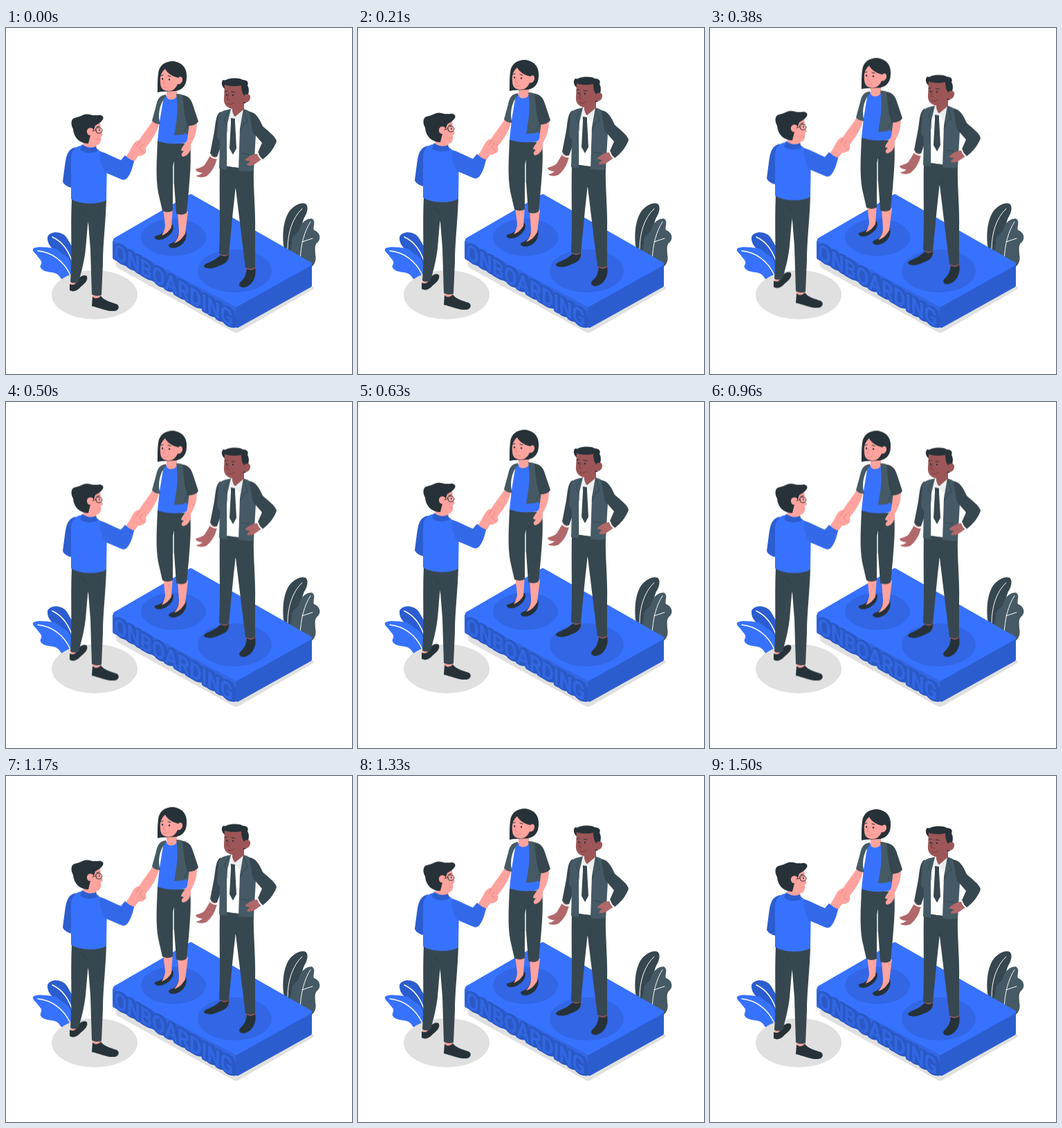
These frames come from a looping animation (500 px wide and 500 px high, 1.54 s). An HTML page:

```html
<!DOCTYPE html>
<html lang="en">
<head>
<meta charset="utf-8">
<title>Onboarding</title>
<style>
  html, body { margin: 0; width: 100%; height: 100%; overflow: hidden; background: #fff; }
  svg { display: block; width: 100%; height: 100%; }
  .blue { fill: #3772ff; }
  .blue2 { fill: #3266e4; }
  .blue3 { fill: #2c5dcf; }
  .dark { fill: #263238; }
  .slate { fill: #37474f; }
  .grey { fill: #455a64; }
  .skin { fill: #ffa39e; }
  .brown { fill: #9c5657; }
  .brown2 { fill: #b1686a; }
  .line { fill: none; stroke-linecap: round; stroke-linejoin: round; }
  .vein { stroke: #fff; stroke-width: 1.4; }
  .ink { stroke: #263238; stroke-width: 1; }
  .fold { stroke: #263238; stroke-width: .8; opacity: .6; }
  .blush { stroke: #e77f7c; stroke-width: .9; }
  .word { font: 700 33px Roboto, sans-serif; stroke-linejoin: round; }
  .float { animation: rise 770ms cubic-bezier(.37, 0, .63, 1) -40ms infinite alternate; }
  @keyframes rise { to { transform: translateY(-8.2px); } }
</style>
</head>
<body>
<svg viewBox="0 0 500 500">
  <defs>
    <text id="word" class="word" transform="matrix(.82 .477 0 1 156 333)">ONBOARDING</text>
  </defs>

  <!-- plants -->
  <g>
    <path class="blue3" d="M98 360C90 348 84 338 76 328C70 320 59 315 60 302C63 294 76 293 84 299C91 305 92 313 98 319C105 329 105 347 98 360Z"/>
    <path class="line vein" d="M67 302C80 308 91 321 97 342"/>
    <path class="blue" d="M94 366C86 368 81 365 78 360C73 352 66 354 59 352C52 350 47 346 51 341C53 336 47 333 45 329C42 325 38 323 39 319C45 315 58 317 67 318C75 319 78 325 84 328C93 333 98 345 95 365Z"/>
    <path class="line vein" d="M46 322C66 324 83 336 93 357"/>
    <path class="slate" d="M402 320C399 304 400 284 406 271C411 259 425 251 433 254C438 258 435 268 431 274C427 282 427 294 422 302L414 325Z"/>
    <path class="line vein" style="stroke-width:1" d="M428 261C414 274 407 296 407 319"/>
    <path class="grey" d="M410 326C411 318 414 313 413 306C415 298 423 298 424 290C427 280 437 274 443 276C448 280 443 288 445 292C453 295 456 303 451 309C445 313 447 321 447 327C449 336 446 343 440 346L410 330Z"/>
    <path class="line vein" style="stroke-width:1" d="M440 280C431 294 426 313 425 336M428 309L443 304"/>
  </g>

  <!-- platform -->
  <path fill="#e0e0e0" d="M158 339L268 283L444 374Q446 376 443 378L337 439Q333 442 328 439L160 346Z"/>
  <g stroke-linejoin="round" stroke-width="6">
    <path class="blue2" stroke="#3266e4" d="M157 309L333 406V430L157 332Z"/>
    <path class="blue3" stroke="#2c5dcf" d="M335 403L439 344V372L335 430Z"/>
    <path class="blue" stroke="#3772ff" d="M158 306L267 243L439 341L333 400Z"/>
  </g>
  <ellipse class="blue2" cx="242" cy="302.500" rx="47" ry="27"/>
  <ellipse class="blue2" cx="330.500" cy="351" rx="53.500" ry="31"/>
  <g fill="#2a59c6" stroke="#2a59c6" stroke-width="4.500">
    <use href="#word" x="4" y="1"/>
    <use href="#word" x="2" y=".5"/>
    <use href="#word"/>
  </g>
  <use href="#word" fill="#3267e2"/>

  <ellipse fill="#e0e0e0" cx="128" cy="385.500" rx="62" ry="35.500"/>

  <g class="float">
    <!-- woman -->
    <g>
      <path class="dark" d="M241 284C244 291 239 300 227 305C219 308 213 304 215 301C224 299 230 294 232 289Z"/>
      <path class="dark" d="M260 294C263 305 255 317 241 318C234 317 233 313 239 311C246 309 248 303 249 298Z"/>
      <path class="skin" d="M227 260H241L239 288C236 293 231 298 225 300C228 295 230 290 230 285ZM248 265H263L259 297C255 304 250 309 243 311C248 305 250 300 250 293Z"/>
      <path class="slate" d="M219 163L248 168L241 200L241 264C236 267 229 266 226 264L220 238C216 215 218 190 219 163Z"/>
      <path class="slate" d="M228 165L266 167C268 190 266 212 264 236L261 267C256 271 250 270 246 268L243 225L243 193C236 190 230 180 228 165Z"/>
      <path class="line fold" d="M242 225V194L249 187"/>
      <path class="skin" d="M212 134C205 145 198 153 192 163L198 178C203 171 216 158 221 139Z"/>
      <path class="blue" d="M228 99C234 96 242 95 249 97L258 118L265 164C250 169 231 168 219 163L222 135Z"/>
      <path class="skin" d="M232 84L247 82L247 99C243 105 233 105 232 99Z"/>
      <path class="grey" d="M231 96C221 98 219 103 217 112L211 134C214 138 219 139 223 139C219 128 221 110 231 99Z"/>
      <path class="grey" d="M246 95C255 95 263 99 266 108L266 157L260 152L256 154L243 155C246 136 250 120 246 95Z"/>
      <path class="skin" d="M265 138L276 136C276 151 272 160 267 168C268 177 263 185 256 186C252 184 254 181 257 178L253 177C254 171 260 167 262 161Z"/>
      <path class="slate" d="M255 97C265 98 268 104 271 114L278 135C275 140 268 142 263 141L258 124Z"/>
      <path class="line fold" d="M259 125L263 140L257 150"/>
      <path class="dark" d="M219 93C219 82 219 74 220 66C221 54 230 48 241 48C254 49 262 58 261 71C261 83 255 89 246 91L224 92Z"/>
      <path class="skin" d="M223 78C222 70 225 63 230 59C233 65 240 70 249 72C252 69 256 71 255 76C254 80 251 82 248 81C246 86 242 91 235 91C226 91 223 86 223 78Z"/>
      <path class="line ink" d="M224 69L227 68M234 69L238 70"/>
      <circle class="dark" cx="226" cy="73.500" r="1.200"/>
      <circle class="dark" cx="236" cy="74.500" r="1.200"/>
      <path class="line blush" d="M229 74L227 80L230 81M227 85C230 87 233 86 235 84"/>
    </g>

    <!-- man in suit -->
    <g>
      <path class="brown" d="M311 322H322V334L310 336ZM347 342H360V353L348 356Z"/>
      <path class="dark" d="M322 327C323 337 316 341 307 344C298 349 287 348 286 344C288 339 301 338 310 328C315 331 319 330 322 327Z"/>
      <path class="dark" d="M360 347C363 361 354 374 343 375C335 374 336 369 341 365C346 360 347 354 348 348C353 351 357 350 360 347Z"/>
      <path class="slate" d="M309 198L340 203L332 228L328 265L322 327C317 329 312 328 308 326C310 287 308 240 309 198Z"/>
      <path class="slate" d="M317 200L358 204C357 230 361 265 360 295L360 346C355 349 350 348 346 346L339 290L332 232C324 226 319 214 317 200Z"/>
      <path class="line fold" d="M331 232L336 225"/>
      <path class="brown2" d="M296 183L305 188C302 200 298 207 290 214C284 217 276 216 275 213C279 213 282 211 284 209C279 209 274 207 274 204C279 202 284 201 287 198Z"/>
      <path fill="#fff" d="M320 120L342 118L346 135L337 200C330 201 323 199 318 197Z"/>
      <path class="brown" d="M327 108H344V122C340 131 331 132 327 123Z"/>
      <path fill="#eceff1" d="M326 117L330 129L322 136L320 120ZM343 118L345 128L337 138L330 129Z"/>
      <path class="slate" d="M325 130L331 131L331 137L333 174L328 183L323 174L325 137Z"/>
      <path class="slate" d="M310 121C303 125 303 137 301 150L295 181C298 185 301 187 305 186L315 158L318 130Z"/>
      <path class="line" stroke="#fff" stroke-width="2" d="M294 183C297 187 301 189 305 188"/>
      <path class="grey" d="M325 117C315 119 309 120 307 128L305 158L309 163L308 203L319 205C320 180 318 153 320 138Z"/>
      <path class="grey" d="M343 117C354 120 360 125 362 136L358 206C350 208 343 207 336 206L338 145Z"/>
      <path class="line fold" d="M322 120L315 133L319 138L320 150M344 119L349 136L343 139L338 151M341 181L352 183"/>
      <path class="slate" d="M351 121C361 121 366 131 371 142C380 150 390 157 391 164C387 175 379 184 371 190C366 189 363 185 363 182L370 166L357 151C354 140 354 129 351 121Z"/>
      <path class="brown2" d="M345 191C350 186 358 181 364 182L369 190C363 194 357 200 349 199C347 197 350 195 353 193Z"/>
      <path class="line" stroke="#fff" stroke-width="2" d="M364 181C365 185 367 188 370 190"/>
      <path class="dark" d="M315 87C311 83 311 77 314 75C317 76 318 75 320 74C329 72 337 72 342 75C349 75 351 79 349 83C353 89 350 98 346 109L336 108Z"/>
      <path class="brown" d="M316 82C324 85 335 84 340 83C340 89 341 94 344 98C347 94 354 95 353 101C352 107 347 109 343 107C341 113 336 118 328 117C319 116 314 110 315 101Z"/>
      <path class="line ink" d="M316 92L320 91M326 92L331 93"/>
      <circle class="dark" cx="319" cy="96.500" r="1.200"/>
      <circle class="dark" cx="328" cy="97" r="1.200"/>
      <path class="line" stroke="#6f3838" stroke-width=".9" d="M322 96L319 103L323 104M320 109C324 112 328 110 330 108"/>
    </g>

    <!-- man in sweater -->
    <g>
      <path class="skin" d="M94 362H106L104 374L93 377ZM125 382H137V394L125 397Z"/>
      <path class="dark" d="M92 370C98 373 102 369 104 364C107 358 114 356 117 359C119 365 113 370 108 374C103 380 97 382 92 379Z"/>
      <path class="dark" d="M125 388C129 392 134 391 137 387C142 394 151 396 160 399C165 402 163 408 157 409C145 410 135 404 124 402Z"/>
      <path class="slate" d="M95 246L124 252L118 285L115 320C113 338 109 352 105 367C101 369 97 369 93 367C96 331 93 290 95 246Z"/>
      <path class="slate" d="M106 249L145 248C144 282 140 312 140 340L138 386C133 388 128 387 124 385L122 320L118 270C112 265 108 257 106 249Z"/>
      <path class="line fold" d="M117 269L112 262"/>
      <path class="blue3" d="M101 172C89 175 87 184 85 199L82 222C84 227 90 230 96 231Z"/>
      <path class="skin" d="M172 187C178 181 180 174 184 168C187 163 193 161 196 164C200 170 204 175 202 180C199 184 195 185 191 185C188 189 186 192 184 195Z"/>
      <path class="line blush" d="M193 163L189 171M198 168L193 174L200 181"/>
      <path class="blue" d="M108 170C98 172 94 179 94 191L94 247C106 255 132 256 145 249L146 185L137 179L130 173Z"/>
      <path fill="#3369e9" d="M136 178C146 181 156 187 166 191L172 184C176 188 181 191 185 192C183 202 180 211 175 217C172 220 169 220 165 218L144 209C138 201 134 188 136 178Z"/>
      <path class="skin" d="M113 158L130 160L131 174C125 178 115 176 111 171Z"/>
      <path class="blue3" d="M110 168C116 173 124 174 130 171L132 178C124 182 113 181 107 176Z"/>
      <path class="skin" d="M121 139L136 136C137 143 137 148 140 154L137 157C138 163 136 169 131 169C124 169 118 165 117 158Z"/>
      <path class="dark" d="M97 146C93 139 94 131 99 130C104 129 108 127 113 125C119 123 124 127 129 126C133 127 136 124 140 128C142 130 139 136 129 141L127 147L123 151L119 167C107 167 98 159 97 146Z"/>
      <path class="skin" d="M126 146C121 142 116 146 117 151C118 156 123 156 126 153Z"/>
      <path class="line ink" d="M125 149L130 147.500M131 143L135 142"/>
      <path class="line ink" d="M130 145C134 143 139 144 139 148C139 152 134 153 131 151Z"/>
      <circle class="dark" cx="135" cy="147.500" r="1"/>
      <path class="line blush" d="M132 161L136 161"/>
    </g>
  </g>
</svg>
</body>
</html>
```
